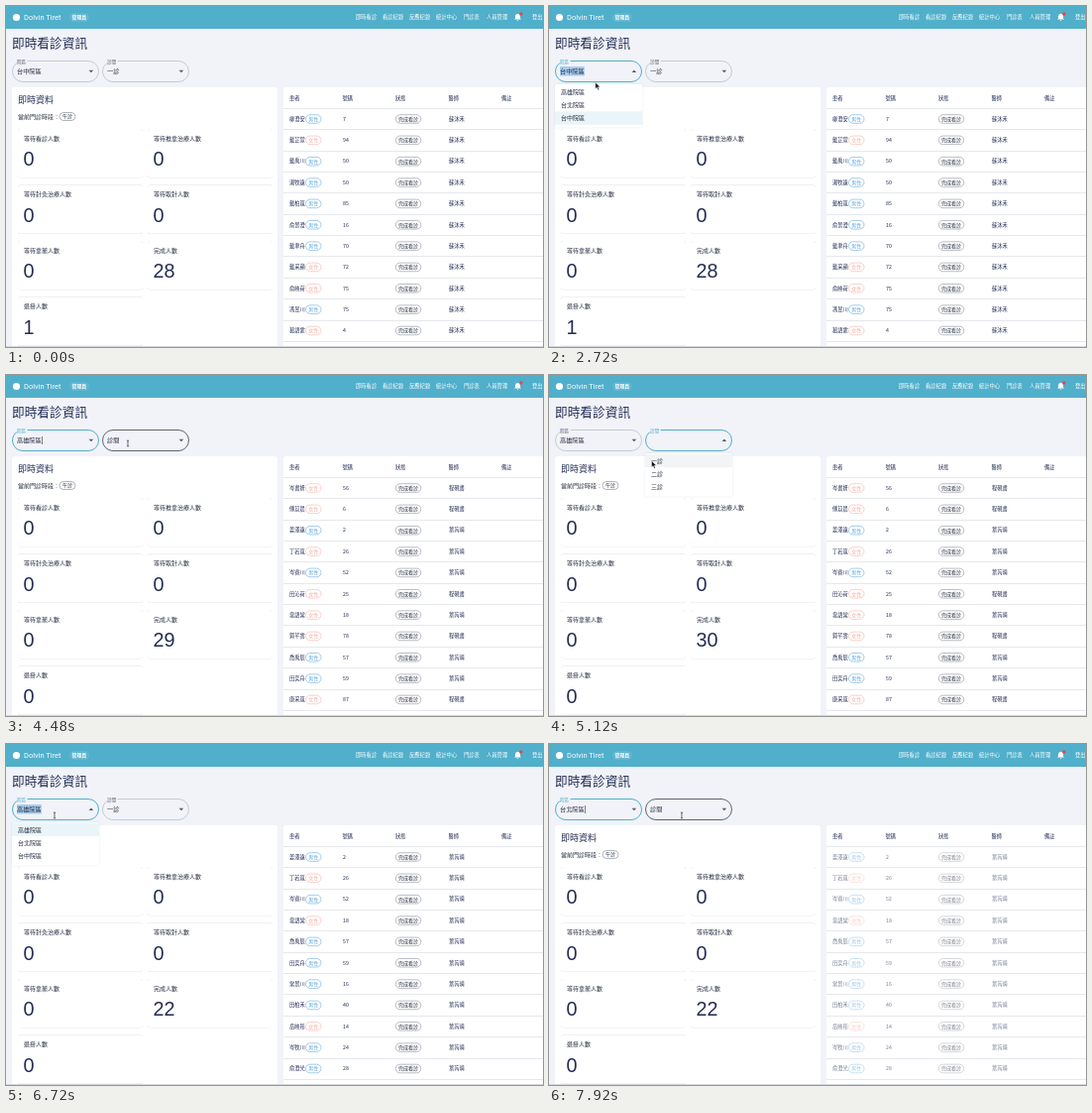
Recreate the animation shown at these times as an HTML page. Size 542 by 344 pixels, loop 8000 ms.

```html
<!DOCTYPE html>
<html lang="zh-Hant">
<head>
<meta charset="utf-8">
<style>
html, body { margin: 0; width: 100%; height: 100%; overflow: hidden; background: #f1f3f8; }
svg { display: block; width: 542px; height: 344px; }
text { font-family: "Noto Sans CJK TC", "Noto Sans CJK", "Noto Sans", sans-serif; white-space: pre; }
.num { font-family: "Liberation Sans", Arial, sans-serif; }
.latin { font-family: Roboto, sans-serif; }
.card { filter: drop-shadow(0 .8px .4px rgba(40, 50, 80, .3)); }
.menu { filter: drop-shadow(0 .5px .8px rgba(40, 50, 80, .1)); }
</style>
</head>
<body>
<svg viewBox="0 0 542 344"><g id="base"></g><g id="table"></g><g id="live"></g></svg>
<script>
const LOOP = 8000, STEP = 80;
const INK = '#232d54', BODY = '#262d3f', TEAL = '#50afca', PAGE = '#f1f3f8';

// y is the vertical middle of the text
const text = (x, y, s, size, fill = INK, more = '') =>
  `<text x="${x}" y="${y + size * 0.37}" font-size="${size}" fill="${fill}" ${more}>${s}</text>`;
const rect = (x, y, w, h, r, fill, more = '') =>
  `<rect x="${x}" y="${y}" width="${w}" height="${h}" rx="${r}" fill="${fill}" ${more}/>`;
const path = (d, fill, more = '') => `<path d="${d}" fill="${fill}" ${more}/>`;
const pill = (x, y, w, h, color, width = 0.6) =>
  rect(x, y - h / 2, w, h, h / 2, 'none', `stroke="${color}" stroke-width="${width}"`);
const ramp = (t, a, b) => Math.min(1, Math.max(0, (t - a) / (b - a)));
const mix = (a, b, p) => a + (b - a) * p;

const nav = [[353, '即時看診'], [380, '看診紀錄'], [407, '反應紀錄'], [434, '統計中心'],
  [462, '門診表'], [485, '人員管理'], [531, '登出']];
const stats = ['等待看診人數', '等待推拿治療人數', '等待針灸治療人數', '等待取針人數',
  '等待拿藥人數', '完成人數', '退掛人數'];
const statX = i => 12 + (i % 2) * 131;
const statY = i => 124 + (i >> 1) * 56.5;

function drawBase() {
  let s = rect(0, 0, 542, 23, 0, TEAL)
    + '<circle cx="10.5" cy="11.5" r="3.6" fill="#fff"/>'
    + text(18, 11.5, 'Dolvin Tiret', 7.5, '#fff', 'class="latin"')
    + rect(64, 7, 20, 9, 4.5, '#60b6cf')
    + text(66.5, 11.5, '管理員', 4.9, '#fff', 'font-weight="700"');
  for (const [x, label] of nav) s += text(x, 11.5, label, 5.3, '#fff');
  s += path('M513 13.6l1-1.2v-2.2q.2-2 2.5-2.4q2.3.4 2.5 2.4v2.2l1 1.2zM515.6 14.2h1.8l-.9 1z', '#fff')
    + '<circle cx="519.8" cy="8" r="1.7" fill="#e5484d"/>'
    + text(6, 37.5, '即時看診資訊', 12.7)
    + rect(6, 82, 268, 270, 3, '#fff') + rect(280, 82, 270, 270, 3, '#fff')
    + text(12, 95, '即時資料', 9)
    + text(12, 111.5, '當前門診時段：', 6, BODY)
    + pill(54, 111.5, 16, 8, '#7b8190') + text(57, 111.5, '午診', 5, BODY);
  stats.forEach((label, i) => {
    s += rect(statX(i), statY(i), 126, 49.3, 2.5, '#fff', 'class="card"')
      + text(statX(i) + 6, statY(i) + 9.6, label, 6, BODY);
  });
  ['患者', '號碼', '狀態', '醫師', '備註'].forEach((h, i) => {
    s += text(286 + i * 53.5, 92.7, h, 5.3, INK, 'font-weight="500"');
  });
  for (let i = 0; i < 12; i++) s += rect(280, Math.round(103 + i * 21.35), 262, 1, 0, '#e6e8ed');
  return s;
}

// name, number, 1 = male, doctor
const rows = (doctors, list) => list.split(' ').map(r => {
  const [name, no, male, d] = r.split(',');
  return { name, no, male: male === '1', doctor: doctors[d] };
});
const first = rows(['蘇沐禾'], '柳澄安,7,1,0 戴芷萱,94,0,0 戴禹川,50,1,0 湯牧遠,50,1,0 戴柏嵐,85,1,0 '
  + '俞景澄,16,1,0 戴聿舟,70,1,0 戴采蘋,72,0,0 俞映荷,75,0,0 馮昱川,75,1,0 葛語霏,4,0,0');
const second = rows(['程硯書', '葉芮晴'], '岑書妍,56,0,0 傅苡晨,6,0,0 姜澤遠,2,1,1 丁若嵐,26,0,1 '
  + '岑睿川,52,1,1 田沁荷,25,0,0 韋語棠,18,0,1 賀芊雲,78,0,0 喬禹辰,57,1,1 田奕舟,59,1,1 康采嵐,87,0,0');
const third = second.filter(r => r.doctor === '葉芮晴').concat(rows(['葉芮晴'],
  '常景川,16,1,0 田柏禾,40,1,0 岳映彤,14,0,0 岑牧川,24,1,0 俞澄光,28,1,0'));

function drawTable(t) {
  const list = t < 4080 ? first : t < 6080 ? second : third;
  const busy = (t >= 3600 && t < 4080) || (t >= 5600 && t < 6080) || t >= 7680;
  return `<g opacity="${busy ? 0.6 : 1}">` + list.map((r, i) => {
    const y = 113.8 + i * 21.35, hue = r.male ? '#62a9e0' : '#f6b0a4';
    return text(286, y, r.name, 5.3)
      + pill(302.5, y + 0.2, 15.5, 8.6, hue) + text(305.2, y + 0.2, r.male ? '男性' : '女性', 5, hue)
      + text(340, y, r.no, 5.3)
      + pill(393.3, y + 0.2, 25.5, 8.6, '#8a909e')
      + text(396, y + 0.2, '完成看診', 5, BODY, 'font-weight="500"')
      + text(447, y, r.doctor, 5.3);
  }).join('') + '</g>';
}

// time, x, y
const track = [[80, 150, 318], [320, 140, 298], [480, 140, 298], [1280, 58.5, 67], [2480, 58.5, 67],
  [2960, 35, 87], [3200, 35, 87], [3520, 111, 74.5], [3840, 123, 69], [4720, 123, 69], [5120, 103.5, 86.5],
  [5760, 103.5, 86.5], [6320, 49, 72], [6720, 49, 72], [7120, 38, 99], [7280, 38, 99], [7760, 134, 72]];

function pointer(t) {
  const i = track.findIndex(k => k[0] > t);
  if (i < 0) return track[track.length - 1].slice(1);
  if (!i) return null;
  const [a, b] = [track[i - 1], track[i]], p = ramp(t, a[0], b[0]), e = p * p * (3 - 2 * p);
  return [mix(a[1], b[1], e), mix(a[2], b[2], e)];
}

function drawCursor([x, y], beam) {
  const at = `transform="translate(${x} ${y})"`;
  return beam
    ? path('M-1.1 -2.8h2.2M0 -2.8v5.6M-1.1 2.8h2.2', 'none', `${at} stroke="#222" stroke-width=".65"`)
    : path('M0 0v6.6l1.6-1.4 1.1 2.5 1.2-.5-1.1-2.4h2z', '#111', `${at} stroke="#fff" stroke-width=".5"`);
}

function drawSelect({ x, label, value, options, focus, open, hover, clear }, cur) {
  const line = focus ? TEAL : hover ? '#3b4252' : '#bcc0c9';
  let s = pill(x + 0.5, 66, 87, 21, line, focus ? 1 : 0.8);
  if (value || focus) {
    s += rect(x + 4, 53.5, 11.5, 4, 0, PAGE) + text(x + 5, 55.8, label, 4.6, focus ? TEAL : '#596072');
  }
  if (open && value) s += rect(x + 5, 61, 6.2 * value.length, 9.5, 0, '#a8cdee');
  if (value || !focus) s += text(x + 5, 66, value || label, 6.2, BODY);
  if (focus && !open && !clear) s += rect(x + 5.3 + 6.2 * value.length, 62, 0.6, 8, 0, '#333');
  if (clear) s += path(`M${x + 68.4} 64.2l3.4 3.4m0 -3.4l-3.4 3.4`, 'none', 'stroke="#555b68" stroke-width=".8"');
  s += path(open ? `M${x + 77.6} 67h4.6l-2.3-2.4z` : `M${x + 77.6} 64.8h4.6l-2.3 2.4z`, '#555b68');
  if (open) {
    s += rect(x, 79, 88, 43.5, 1.5, '#fff', 'class="menu"');
    options.forEach((o, i) => {
      const y = 79.6 + i * 13.4;
      const over = cur && cur[0] > x && cur[0] < x + 88 && cur[1] >= y && cur[1] < y + 13.4;
      if (o === value || over) s += rect(x, y, 88, 13.4, 0, o === value ? '#eaf5f9' : '#f3f4f6');
      s += text(x + 6, y + 6.7, o, 6, BODY);
    });
  }
  return s;
}

function drawLive(t) {
  const cur = pointer(t);
  const inField = x => t > 1800 && cur && cur[0] > x && cur[0] < x + 88 && cur[1] > 55 && cur[1] < 76.5;
  const done = Math.round(t < 5600 ? mix(28, 30, ramp(t, 4000, 4960)) : mix(30, 22, ramp(t, 6080, 6640)));
  const onRoom = t >= 4640 && t < 6400;
  let s = stats.map((_, i) => {
    const n = i === 5 ? done : i === 6 && t < 4080 ? 1 : 0;
    return text(statX(i) + 5.5, statY(i) + 30, n, 19.8, INK, 'class="num"');
  }).join('');
  s += drawSelect({
    x: 97, label: '診間', options: ['一診', '二診', '三診'],
    value: t < 3200 || (t >= 5520 && t < 7280) ? '一診' : '',
    focus: onRoom, open: t >= 4640 && t < 5520, hover: inField(97), clear: onRoom && t >= 5520
  }, cur);
  s += drawSelect({
    x: 6, label: '院區', options: ['高雄院區', '台北院區', '台中院區'],
    value: t < 3200 ? '台中院區' : t < 7280 ? '高雄院區' : '台北院區',
    focus: t >= 1920 && !onRoom, open: (t >= 1920 && t < 3200) || (t >= 6400 && t < 7280), hover: inField(6)
  }, cur);
  s += rect(0, 343, 542, 1, 0, '#d5d8de');
  if (cur) s += drawCursor(cur, inField(6) || inField(97));
  return s;
}

const el = id => document.getElementById(id);
el('base').innerHTML = drawBase();
const start = performance.now();
let shown = -1;
function frame() {
  const t = Math.floor(((performance.now() - start) % LOOP) / STEP) * STEP;
  if (t !== shown) {
    shown = t;
    el('table').innerHTML = drawTable(t);
    el('live').innerHTML = drawLive(t);
  }
  requestAnimationFrame(frame);
}
frame();
</script>
</body>
</html>
```
